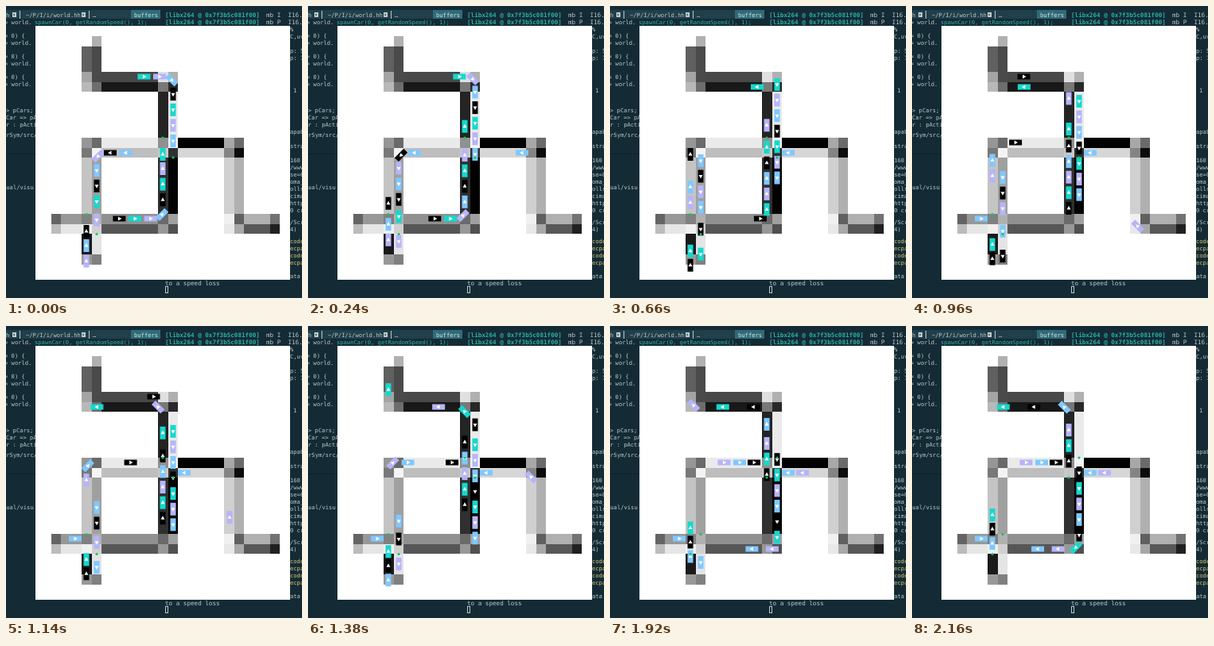
Recreate the animation shown at these times as an HTML page. Size 372 px wide and 368 px high, loop 2.22 s.

```html
<!DOCTYPE html>
<html lang="en">
<head>
<meta charset="utf-8">
<title>Traffic simulation</title>
<style>
html, body { margin: 0; width: 100%; height: 100%; overflow: hidden; background: #142b35; }
svg { display: block; width: 372px; height: 368px; }
text { font-family: "DejaVu Sans Mono", monospace; white-space: pre; }
</style>
</head>
<body>
<svg viewBox="0 0 372 368">
  <g id="terminal" fill="#b9c7c7"></g>
  <rect x="37" y="25" width="320" height="320" fill="#fff"/>
  <g id="roads" shape-rendering="crispEdges"></g>
  <g id="cars"></g>
  <g id="lights" fill="#08c85c"></g>
</svg>
<script>
const LOOP = 2220, STEP = 60;
const $ = id => document.getElementById(id);

function add(parent, tag, attrs, content) {
  const node = document.createElementNS('http://www.w3.org/2000/svg', tag);
  for (const key in attrs) node.setAttribute(key, attrs[key]);
  if (content) node.textContent = content;
  parent.appendChild(node);
  return node;
}
const box = (parent, x, y, width, height, fill) => add(parent, 'rect', { x, y, width, height, fill });

// Terminal windows behind the simulation
const term = $('terminal'), TEAL = '#2bb0a6', SMALL = 7.15, LARGE = 7.6;
const write = (x, y, text, size = SMALL, style = {}) =>
  add(term, 'text', { x, y, 'font-size': size, ...style }, text);
const column = (x, y, lines, size, style) =>
  lines.forEach((line, i) => line && write(x, y + i * 9, line, size, style));

box(term, 0, 5, 194, 11, '#213f4a');
box(term, 157, 5, 37, 11, '#2f6b78');
box(term, 0, 186, 37, 1, '#0d2029');
write(0, 14, 'h');
write(25, 14, '~/P/I/i/world.hh');
write(109, 14, '…');
for (const x of [8, 95]) {
  box(term, x, 8, 5, 6, '#c3d0d0');
  add(term, 'path', { d: `M${x + 1.5} 9.5l2 1.5-2 1.5z`, fill: '#213f4a' });
  box(term, x + 9, 6, 1, 10, '#b9c7c7');
}
write(161, 14, 'buffers', SMALL, { fill: '#d8e8e8' });
write(-2, 23, '= world.');
write(36, 23, 'spawnCar(0, getRandomSpeed(), 1);', SMALL, { fill: TEAL });
for (let i = 0; i < 3; i++) column(-2, 39.5 + i * 26, ['= 0) {', '= world.']);
column(0, 134, ['> pCars;', 'Car => pA', 'r : pActi']);
write(-4, 165, 'erSym/src/');
write(-4, 231, 'sual/visu');

['mb I  I16..4: 1', 'mb P  I16..4: 0'].forEach((tail, i) => {
  write(200, 14 + i * 9, '[libx264 @ 0x7f3b5c081f00]', LARGE, { fill: TEAL, 'font-weight': 'bold' });
  write(327, 14 + i * 9, tail, LARGE);
});
column(357, 32, ['%', 'C,uv', '', 'p: 5', 'p: 7']);
write(361, 109, '1');
column(357, 161, ['apab', '', 'stra', '', '160', '/www', 'se=0', 'oma_', 'olls', 'cima', 'http', '0 cr']);
column(357, 275, ['/Scr', '4)']);
column(357, 299, ['code', 'ecpa', 'code', 'ecpa'], SMALL, { fill: '#d8c673' });
write(357, 343, 'ata');
write(200, 352, 'to a speed loss', LARGE);
add(term, 'rect', { x: 200.5, y: 353.5, width: 3, height: 8, fill: 'none', stroke: '#b9c7c7' });

// Roads: two grey lanes each, joined by blocks of four tiles
const roads = $('roads');
const tile = (x, y, w, h, grey) => box(roads, x, y, w, h, '#' + grey.repeat(3));
function across(x, y, w, upper, lower) {
  tile(x, y, w, 13, upper);
  tile(x, y + 13, w, 12, lower);
}
function upright(x, y, h, left, right) {
  tile(x, y, 13, h, left);
  tile(x + 13, y, 12, h, right);
}
function junction(x, y, a, b, c, d) {
  upright(x, y, 13, a, b);
  upright(x, y + 13, 12, c, d);
}
tile(108, 38, 12, 13, 'b0');
upright(95, 51, 32, '60', '4a');
across(120, 83, 71, '48', '18');
upright(191, 108, 58, '24', 'ea');
across(120, 166, 71, 'ea', 'be');
across(216, 166, 58, '02', 'd6');
upright(95, 191, 71, 'c4', 'a0');
upright(191, 191, 71, '30', '02');
upright(274, 191, 71, 'd0', 'b0');
across(57, 262, 12, '64', 'bc');
across(69, 262, 26, '98', 'e6');
across(120, 262, 71, '90', '56');
across(299, 262, 33, 'b0', '58');
across(332, 262, 12, '72', '20');
upright(95, 287, 26, '1a', 'e4');
upright(95, 313, 13, '98', '80');
junction(95, 83, 'a4', '4a', 'b8', '6d');
junction(191, 83, 'e0', 'b0', '78', '28');
junction(95, 166, '96', '6a', '78', 'f4');
junction(191, 166, '90', 'f4', 'c8', '30');
junction(274, 166, 'a8', '6a', '84', '0c');
junction(95, 262, '80', 'b0', 'f0', 'd0');
junction(191, 262, '6a', 'a0', '98', '50');
junction(274, 262, 'f0', '60', 'e8', 'a8');

// Routes are right-angled paths with cut corners; distances count the uncut length
const CORNER = 6;
function makeRoute(...points) {
  const legs = points.slice(1).map(([x, y], i) => {
    const [px, py] = points[i];
    const length = Math.hypot(x - px, y - py);
    return { px, py, length, ux: (x - px) / length, uy: (y - py) / length };
  });
  const total = legs.reduce((sum, leg) => sum + leg.length, 0);

  function at(s) {
    let i = 0;
    while (i < legs.length - 1 && s > legs[i].length) s -= legs[i++].length;
    const leg = legs[i];
    return { x: leg.px + leg.ux * s, y: leg.py + leg.uy * s, angle: Math.atan2(leg.uy, leg.ux) };
  }
  function pose(s) {
    let bend = 0;
    for (const leg of legs.slice(0, -1)) {
      bend += leg.length;
      if (Math.abs(s - bend) < CORNER) {
        const a = at(bend - CORNER), b = at(bend + CORNER);
        const k = (s - bend + CORNER) / (2 * CORNER);
        return { x: a.x + (b.x - a.x) * k, y: a.y + (b.y - a.y) * k, angle: Math.atan2(b.y - a.y, b.x - a.x) };
      }
    }
    return at(s);
  }
  return { total, pose };
}
const centre = makeRoute([120, 268], [197, 268], [197, 102], [101, 102], [101, 79]);
const north = makeRoute([114, 40], [114, 89], [210, 89], [210, 281], [110, 281]);
const south = makeRoute([170, 185], [114, 185], [114, 317]);
const climb = makeRoute([101, 330], [101, 172], [190, 172]);
const west = makeRoute([63, 268], [95, 268]);
const east = makeRoute([338, 281], [281, 281], [281, 185], [216, 185]);

// Speeds in pixels per millisecond
const JAM = 0.0705, FLOW = 0.112, CRUISE = 0.147, RUSH = 0.25;
const GAP = 19.6;
const paint = { black: '#000', lilac: '#b6b4fa', sky: '#7fc8ff', teal: '#14d9cd' };
const cars = [];

function car(route, colour, motion) {
  const node = add($('cars'), 'g');
  box(node, -8, -3.5, 16, 7, paint[colour]);
  add(node, 'path', { d: 'M-1.5-2.5L3 0-1.5 2.5z', fill: '#fff' });
  cars.push({ node, route, motion });
}

// Constant speed from birth to an optional stop; past `release` the speed is multiplied by `boost`
function drive({ start = 0, speed = JAM, born = 0, stop = Infinity, release = Infinity, boost = 1.6 }) {
  return t => {
    if (t < born) return -1;
    const s = start + speed * (t - born);
    return Math.min(stop, s > release ? release + (s - release) * boost : s);
  };
}

// Cars one gap apart; `spread` lets each follower speed up a little later
function platoon(route, colours, { start, stop = Infinity, release = Infinity, spread = 0, ...rest }) {
  colours.split(' ').forEach((colour, i) => car(route, colour, drive({
    ...rest, start: start - i * GAP, stop: stop - i * GAP, release: release + i * spread
  })));
}

car(centre, 'teal', drive({ start: 158, speed: CRUISE }));
platoon(centre, 'lilac teal black sky lilac teal black', { start: 140, release: 173, spread: 12 });

platoon(north, 'sky lilac teal black sky lilac teal', { start: 226, release: 325, spread: 10, boost: 1.2 });
const tail = cars[cars.length - 1].motion;
const chase = drive({ start: 8, speed: RUSH, born: 690 });
car(north, 'black', t => Math.min(chase(t), tail(t) - GAP));

platoon(south, 'lilac teal black sky lilac black sky', { start: 137, release: 131 });

car(climb, 'black', drive({ start: 46, speed: CRUISE, stop: 238 }));
platoon(climb, 'sky lilac', { start: 28, speed: FLOW, stop: 220 });

// A queue that slowly gathers speed from standstill
['teal', 'black', 'sky'].forEach((colour, i) =>
  car(climb, colour, t => t < 300 ? -1 : 14 + 16.7 * (t / 1000) ** 2 - 18 * i));

car(west, 'sky', drive({ speed: CRUISE, born: 740, stop: 24 }));
car(east, 'sky', drive({ start: 120, speed: RUSH, born: STEP, stop: 210 }));
car(east, 'lilac', drive({ speed: 0.215, born: 690, stop: 192 }));

// Green lights: opposite corners of each crossing swap when the phase changes
const SWITCH = 1600, lights = [];
for (const [x, y] of [[107.5, 275], [203.5, 178.5]])
  for (const dx of [-6.5, 6.5])
    for (const dy of [-12.5, 12.5])
      lights.push({
        node: add($('lights'), 'circle', { cx: x + dx, cy: y + dy, r: 1.6 }),
        early: dx * dy > 0
      });

const show = (node, visible) => { node.style.display = visible ? '' : 'none'; };

function render(t) {
  for (const { node, route, motion } of cars) {
    const s = motion(t), visible = s >= 0 && s <= route.total;
    show(node, visible);
    if (!visible) continue;
    const { x, y, angle } = route.pose(s);
    node.setAttribute('transform',
      `translate(${x.toFixed(2)} ${y.toFixed(2)}) rotate(${(angle * 180 / Math.PI).toFixed(1)})`);
  }
  for (const { node, early } of lights) show(node, early === t < SWITCH);
}

const begin = performance.now();
function tick() {
  const t = (performance.now() - begin) % LOOP;
  render(Math.floor(t / STEP) * STEP);
  requestAnimationFrame(tick);
}
tick();
</script>
</body>
</html>
```
